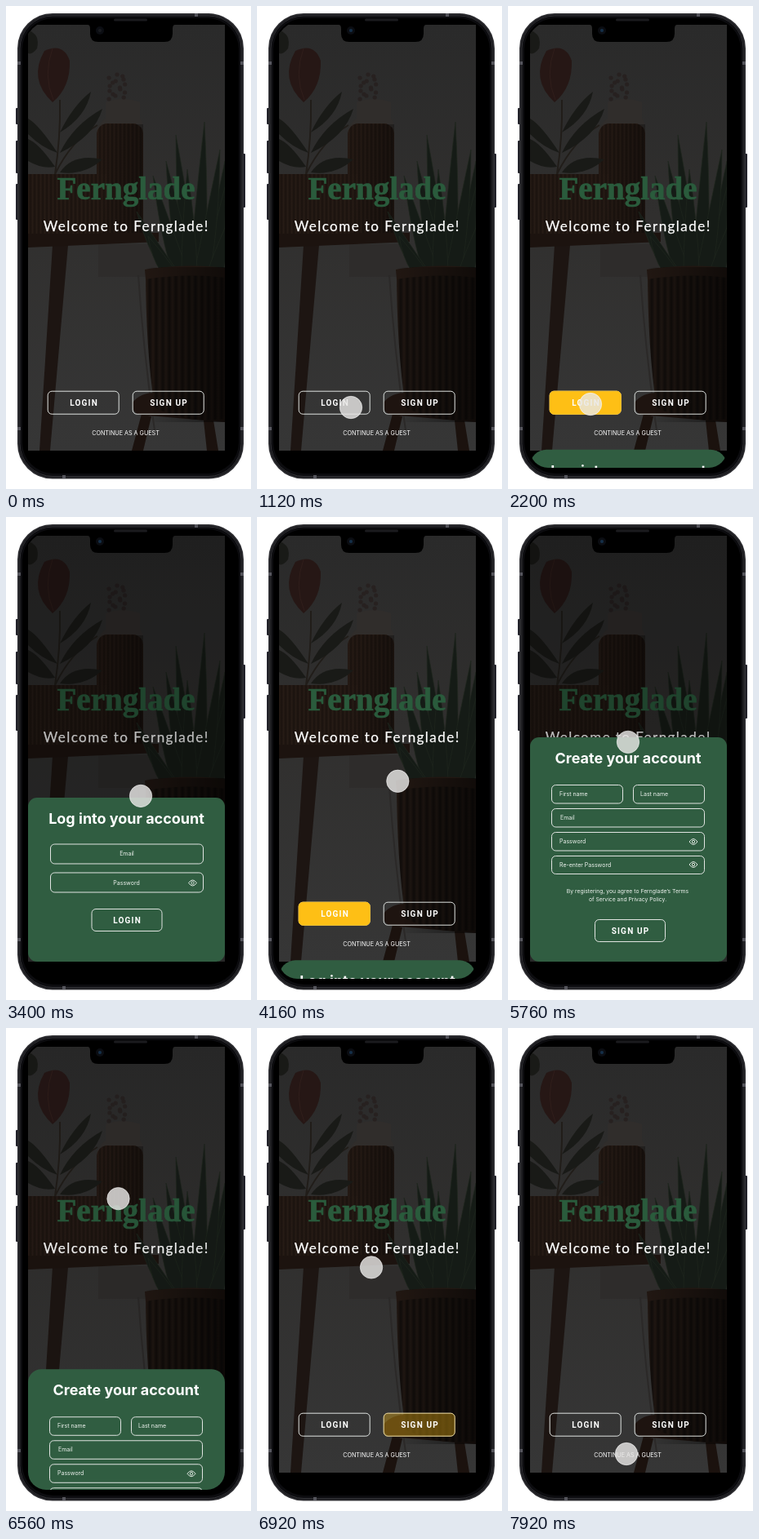
These frames come from a looping animation (300x592 px, 8 s). An HTML page:

```html
<!DOCTYPE html>
<html lang="en">
<head>
<meta charset="utf-8">
<title>Plant shop welcome screen</title>
<style>
html, body { margin: 0; width: 100%; height: 100%; overflow: hidden; background: #fff; }
svg { display: block; width: 300px; height: 592px; }
text { font-family: Inter, "Open Sans", sans-serif; fill: #fff; }
.mid { text-anchor: middle; }
.logo { font: bold 39px "Liberation Serif", serif; fill: #2a5b3c; stroke: #2a5b3c; stroke-width: .7; }
.hello { font: 17px Lato, sans-serif; letter-spacing: 1.45px; stroke: #fff; stroke-width: .25; }
.label { font: bold 10px Roboto, sans-serif; letter-spacing: 1.2px; }
.title { font-size: 18px; font-weight: 700; }
.small { font-size: 7px; fill: #eef3ef; }
.terms { font-size: 6.8px; fill: #eef3ef; }
.line { fill: none; stroke: #e0e4e1; stroke-width: 1; }
.lit { fill: #ffc015; stroke: #ffc015; }
.sheet { fill: #305d41; }
</style>
</head>
<body>
<svg viewBox="0 0 300 592">
  <defs>
    <clipPath id="display"><rect x="22" y="17" width="262" height="555" rx="36"/></clipPath>
    <clipPath id="photo"><rect x="27" y="23" width="241" height="522"/></clipPath>
    <clipPath id="view"><rect x="27" y="23" width="241" height="543" rx="22"/></clipPath>
    <linearGradient id="wall" x1="0" y1="0" x2="0" y2="1">
      <stop offset="0" stop-color="#2a2a2a"/><stop offset=".45" stop-color="#302f2e"/>
      <stop offset="1" stop-color="#363636"/>
    </linearGradient>
    <linearGradient id="ribs" gradientUnits="userSpaceOnUse" x1="0" y1="0" x2="5" y2="0" spreadMethod="repeat">
      <stop offset="0" stop-color="#1a120e"/><stop offset=".5" stop-color="#261b15"/>
      <stop offset="1" stop-color="#1a120e"/>
    </linearGradient>
    <linearGradient id="bigRibs" gradientUnits="userSpaceOnUse" x1="0" y1="0" x2="8" y2="0" spreadMethod="repeat">
      <stop offset="0" stop-color="#100c0a"/><stop offset=".5" stop-color="#201712"/>
      <stop offset="1" stop-color="#100c0a"/>
    </linearGradient>
    <linearGradient id="shade">
      <stop offset="0" stop-color="#000" stop-opacity="0"/><stop offset="1" stop-color="#000" stop-opacity=".5"/>
    </linearGradient>
    <g id="eye" fill="none" stroke="#dfe7e1" stroke-width="1">
      <path d="M-5 0Q0-7 5 0Q0 7-5 0Z"/><circle r="1.7"/>
    </g>
  </defs>

  <!-- phone body -->
  <g fill="#22222a">
    <rect x="12" y="125" width="4" height="20" rx="1"/>
    <rect x="12" y="165" width="4" height="40" rx="1"/>
    <rect x="12" y="218" width="4" height="44" rx="1"/>
    <rect x="288" y="181" width="5" height="66" rx="1"/>
  </g>
  <rect x="15" y="10" width="275" height="568.500" rx="42" fill="#0c0c0f" stroke="#2b2b2f" stroke-width="2"/>
  <rect x="17" y="12" width="271" height="564.500" rx="40" fill="none" stroke="#303034" stroke-width="1"/>
  <path d="M14 70h4M287 70h4M14 518h4M287 518h4M233 9v4M71 575v4" stroke="#55555c" stroke-width="4"/>
  <rect x="20" y="15" width="265" height="558" rx="38" fill="#000"/>

  <g clip-path="url(#display)">
    <g clip-path="url(#photo)">
      <rect x="27" y="23" width="241" height="522" fill="url(#wall)"/>
      <path d="M113 292h72v40h-72z" fill="#2e2c2b"/>
      <path d="M162 330Q168 420 182 520" fill="none" stroke="#2b2928" stroke-width="2"/>
      <!-- table -->
      <path d="M57 293h19l-22 252H41z" fill="#1d1512"/>
      <path d="M27 278h160v11L27 296z" fill="#1c130f"/>
      <!-- bottle -->
      <path d="M122 118Q143 110 164 118V138Q168 142 168 154H111Q113 144 122 138Z" fill="#302d2b"/>
      <path d="M111 156Q113 146 122 144H158Q167 147 168 156V278H111z" fill="url(#ribs)"/>
      <path d="M111 145h57v133h-57z" fill="url(#shade)" opacity=".6"/>
      <g id="berries" fill="#272120"></g>
      <!-- small pot and flower -->
      <path d="M27 206h96q1 50-9 73H27z" fill="url(#ribs)"/>
      <path d="M66 115Q67 160 60 206M60 206Q80 165 112 146" fill="none" stroke="#211d19" stroke-width="2"/>
      <path d="M57 118Q27 90 47 55Q70 44 78 67Q79 100 57 118Z" fill="#261715"/>
      <path d="M58 115Q45 85 57 52" fill="none" stroke="#301e1b"/>
      <g fill="#191a17">
        <path d="M27 30Q42 34 38 52Q32 60 27 58Z"/>
        <path d="M60 197Q40 168 27 163V190Q44 200 60 197Z"/>
        <path d="M63 180Q40 145 27 138V157Q44 174 63 180Z"/>
        <path d="M66 180Q82 146 118 126Q108 160 66 180Z"/>
        <path d="M66 204Q82 180 118 188Q96 208 66 204Z"/>
        <path d="M66 155Q82 122 104 105Q98 136 66 155Z"/>
      </g>
      <!-- aloe and its stand -->
      <g id="aloe" fill="#151b16" stroke="#20271f" stroke-width=".7"></g>
      <path d="M155 486Q165 473 185 474H268V510L163 501Q154 498 155 486Z" fill="#1e1410"/>
      <path d="M166 500l12 3-10 42h-14zM242 508h12l6 37h-14z" fill="#1b120e"/>
      <path id="pot" d="M171 323Q220 316 268 322V506Q220 512 182 492Q171 420 171 323Z" fill="url(#bigRibs)"/>
      <path d="M170 323Q220 315 268 321V333Q220 327 171 335Z" fill="#211712"/>
      <path d="M171 320H268V510H182Q171 420 171 320Z" fill="url(#shade)"/>
    </g>

    <text class="mid logo" x="147" y="237">Fernglade</text>
    <text class="mid hello" x="147.200" y="276">Welcome to Fernglade!</text>
    <rect class="line" x="51.200" y="472.200" width="87" height="28" rx="5"/>
    <rect class="line" x="155.200" y="472.200" width="87" height="28" rx="5"/>
    <rect id="login" class="lit" x="51.200" y="472.200" width="87" height="28" rx="5"/>
    <rect id="signup" class="lit" x="155.200" y="472.200" width="87" height="28" rx="5"/>
    <text class="mid label" x="95.600" y="490">LOGIN</text>
    <text class="mid label" x="199.600" y="490">SIGN UP</text>
    <text class="mid" x="146.500" y="526" font-size="7.200">CONTINUE AS A GUEST</text>
    <rect id="dim" x="27" y="23" width="241" height="522"/>

    <g clip-path="url(#view)">
      <g id="logSheet">
        <rect class="sheet" x="27" y="344" width="241" height="201"/>
        <text class="mid title" x="147.500" y="376">Log into your account</text>
        <rect class="line" x="54.500" y="401" width="187" height="24" rx="5"/>
        <rect class="line" x="54.500" y="436" width="187" height="24" rx="5"/>
        <text class="mid small" x="148" y="414.500">Email</text>
        <text class="mid small" x="147.500" y="450.500">Password</text>
        <use href="#eye" x="228.500" y="448.500"/>
        <rect class="line" x="105" y="480.500" width="86" height="27" rx="5"/>
        <text class="mid label" x="148.600" y="498">LOGIN</text>
      </g>
      <g id="signSheet">
        <rect class="sheet" x="27" y="270" width="241" height="275"/>
        <text class="mid title" x="147" y="302">Create your account</text>
        <rect class="line" x="53.500" y="328.500" width="87" height="22.500" rx="5"/>
        <rect class="line" x="153.500" y="328.500" width="87" height="22.500" rx="5"/>
        <rect class="line" x="53.500" y="357.500" width="187" height="22.500" rx="5"/>
        <rect class="line" x="53.500" y="386.500" width="187" height="22.500" rx="5"/>
        <rect class="line" x="53.500" y="415.500" width="187" height="22" rx="5"/>
        <text class="small" x="63" y="342">First name</text>
        <text class="small" x="162" y="342">Last name</text>
        <text class="small" x="64" y="371">Email</text>
        <text class="small" x="63" y="400">Password</text>
        <text class="small" x="63" y="429">Re-enter Password</text>
        <use href="#eye" x="227" y="398"/>
        <use href="#eye" x="227" y="426"/>
        <text class="mid terms" x="146.500" y="460.500">By registering, you agree to Fernglade’s Terms</text>
        <text class="mid terms" x="146.500" y="470.500">of Service and Privacy Policy.</text>
        <rect class="line" x="106.500" y="493.500" width="86" height="27" rx="5"/>
        <text class="mid label" x="150.100" y="511">SIGN UP</text>
      </g>
    </g>
  </g>

  <!-- notch -->
  <path d="M100 15H207V23Q204 23 204 28V34Q204 44 194 44H113Q103 44 103 34V28Q103 23 100 23Z"/>
  <rect x="132" y="15.500" width="41" height="3" rx="1.500" fill="#1b1b1e"/>
  <circle cx="115" cy="30" r="5" fill="#0b0d12"/>
  <circle cx="115" cy="30" r="2" fill="#1a1c20"/>
  <circle id="lens" cx="115" cy="30" r="2" fill="#142f48"/>

  <circle id="cursor" r="13.700" fill="#e8e7e5" fill-opacity=".82" stroke="#fff" stroke-opacity=".55"/>
</svg>
<script>
const $ = id => document.getElementById(id);
const LOOP = 8000;
const ramp = (t, start, length) => Math.min(1, Math.max(0, (t - start) / length));
const easeOut = p => 1 - (1 - p) ** 2;

// time, x, y
const path = [
  [600, 121, 608], [1120, 115, 492], [1400, 115, 492], [1880, 101, 488],
  [3120, 101, 488], [3400, 165, 342], [3920, 172, 322], [4120, 172, 322],
  [4760, 212, 478], [4960, 220, 480], [5560, 220, 480], [5760, 147, 276],
  [6320, 138, 228], [6480, 138, 228], [6640, 137, 191], [6920, 140, 293],
  [7300, 144, 468], [7920, 145, 522]
];

const rate = (i, k) => path[i] && path[i + 1]
  ? (path[i + 1][k] - path[i][k]) / (path[i + 1][0] - path[i][0]) : 0;

// monotone tangent: rests at holds and turning points
function tangent(i, k) {
  const a = rate(i - 1, k), b = rate(i, k);
  return a * b <= 0 ? 0 : 2 * a * b / (a + b);
}

function along(t, k) {
  const last = path.length - 1;
  if (t <= path[0][0]) return path[0][k];
  if (t >= path[last][0]) return path[last][k];
  const i = path.findIndex(p => p[0] > t) - 1;
  const span = path[i + 1][0] - path[i][0], u = (t - path[i][0]) / span, v = 1 - u;
  return path[i][k] * v * v * (1 + 2 * u) + path[i + 1][k] * u * u * (3 - 2 * u)
    + span * u * v * (v * tangent(i, k) - u * tangent(i + 1, k));
}

// the corners tighten as the sheet rises
function slide(id, top, t, open, close) {
  const shown = easeOut(ramp(t, open, 310)) - easeOut(ramp(t, close, 310));
  $(id).setAttribute("transform", `translate(0 ${(566 - top) * (1 - shown)})`);
  $(id).querySelector(".sheet").setAttribute("rx", 21 - 10 * shown);
  return shown;
}

const glow = (t, on, length, off) => ramp(t, on, length) - ramp(t, off, 215);

function draw(t) {
  const a = slide("logSheet", 344, t, 2185, 3950);
  const b = slide("signSheet", 270, t, 5106, 6470);
  $("dim").setAttribute("opacity", .26 * (a * a + b * b));
  $("login").setAttribute("opacity", glow(t, 1400, 300, 4260));
  $("signup").setAttribute("opacity", glow(t, 4770, 190, 6780));
  $("lens").setAttribute("opacity", ramp(t, 0, 240));
  $("cursor").setAttribute("transform", `translate(${along(t, 1)} ${along(t, 2)})`);
}

// aloe leaves: tip x, tip y, base x
$("aloe").innerHTML = [
  [268, 190, 250], [208, 158, 225], [243, 142, 234], [196, 190, 220], [268, 222, 252],
  [180, 208, 212], [262, 176, 240], [160, 252, 200], [222, 200, 224], [174, 282, 198], [268, 272, 256]
].map(([x, y, base]) => {
  const mx = (x + base) / 2, my = y + (325 - y) * .6;
  return `<path d="M${base - 9} 325Q${mx - 8} ${my} ${x} ${y}Q${mx + 10} ${my} ${base + 10} 325Z"/>`;
}).join("");

$("berries").innerHTML = Array.from({ length: 16 }, (_, i) =>
  `<circle cx="${136 + 10 * Math.sin(i * 2.4)}" cy="${84 + i * 2}" r="2.6"/>`).join("");

function frame(now) {
  draw(now % LOOP);
  requestAnimationFrame(frame);
}
draw(0);
requestAnimationFrame(frame);
</script>
</body>
</html>
```
